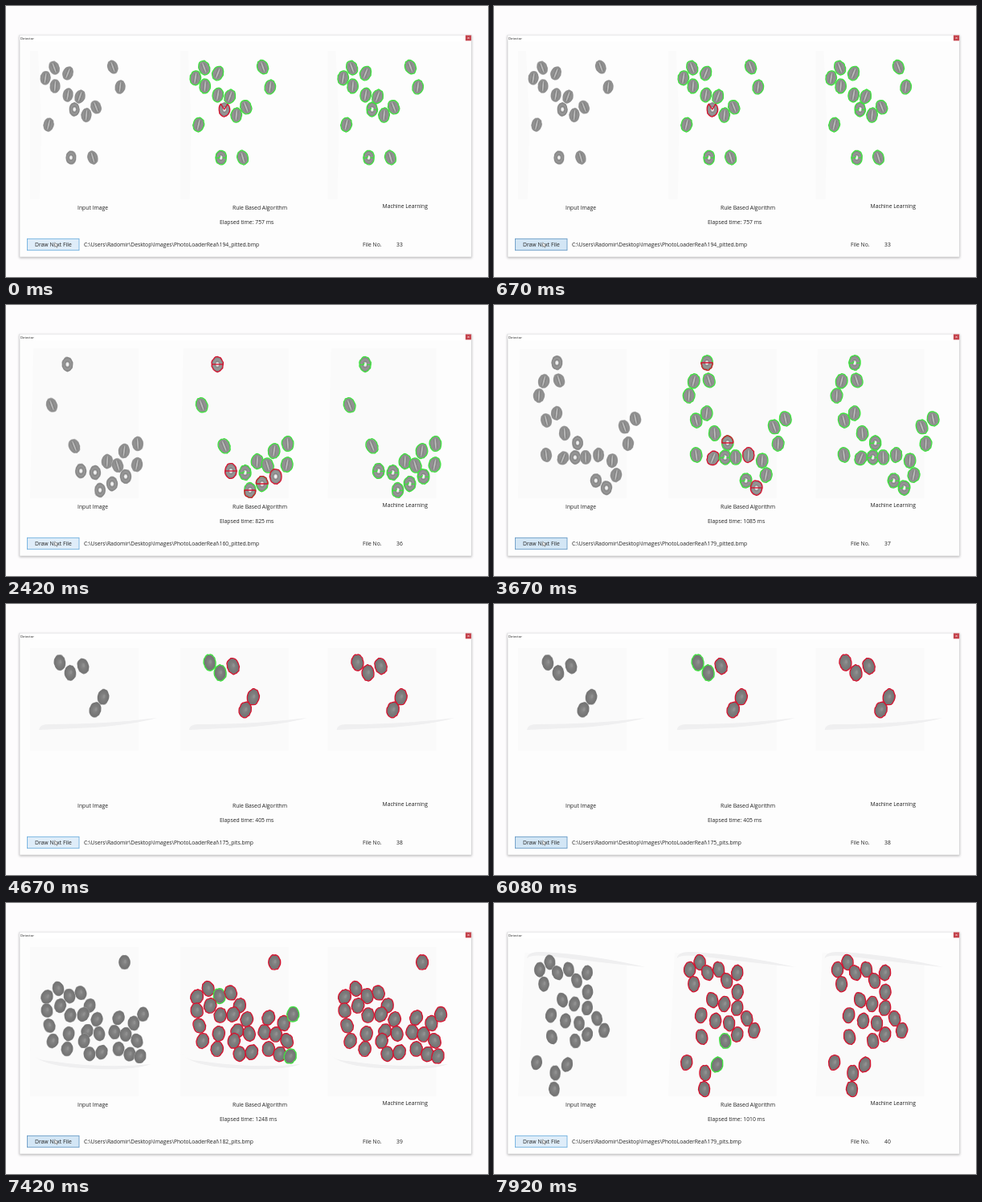
Animation of 600 by 338 pixels, one loop 8 s. Source, as an HTML page:

```html
<!DOCTYPE html>
<html lang="en">
<head>
<meta charset="utf-8">
<title>Detector</title>
<style>
html, body { margin: 0; width: 100%; height: 100%; overflow: hidden; background: #fdfcfd; }
svg { display: block; width: 600px; height: 338px; }
text { font: 6.8px "Open Sans", "Noto Sans", sans-serif; fill: #222; }
.window { fill: #fdfdfd; stroke: #d2d2d4; stroke-width: .6; filter: drop-shadow(0 1px 1.6px rgba(0,0,0,.28)); }
.outline { fill: none; stroke-width: 1.35; stroke-linejoin: round; }
.plate { fill: #fafafa; }
.streak { fill: #efeff0; }
</style>
</head>
<body>
<svg viewBox="0 0 600 338">
  <defs>
    <radialGradient id="ring">
      <stop offset="0" stop-color="#fafafa"/><stop offset=".2" stop-color="#e6e6e6"/>
      <stop offset=".38" stop-color="#858585"/><stop offset=".62" stop-color="#999"/>
      <stop offset=".88" stop-color="#858585"/><stop offset="1" stop-color="#b4b4b4"/>
    </radialGradient>
    <radialGradient id="split">
      <stop offset="0" stop-color="#a2a2a2"/><stop offset=".6" stop-color="#919191"/>
      <stop offset=".88" stop-color="#8d8d8d"/><stop offset="1" stop-color="#b8b8b8"/>
    </radialGradient>
    <radialGradient id="pit">
      <stop offset="0" stop-color="#8b8b8b"/><stop offset=".55" stop-color="#7b7b7b"/>
      <stop offset=".88" stop-color="#737373"/><stop offset="1" stop-color="#a6a6a6"/>
    </radialGradient>
  </defs>
  <rect class="window" x="17" y="36.3" width="562.5" height="276.7"/>
  <rect x="17.3" y="36.6" width="562" height="7.4" fill="#fff"/>
  <text x="18" y="41.7" style="font-size:4.2px">Detector</text>
  <rect x="572" y="36.5" width="7.2" height="6.8" fill="#c4434c"/>
  <path d="M574.6 38.9l2 2m0-2l-2 2" stroke="#fff" stroke-width=".6"/>
  <g id="panels"></g>
  <text x="89" y="253.8">Input Image</text>
  <text x="282" y="253.8">Rule Based Algorithm</text>
  <text x="468.5" y="251.6">Machine Learning</text>
  <text id="elapsed" x="266" y="271.6"></text>
  <rect id="button" x="26.4" y="290.3" width="64.6" height="14.4" stroke-width=".8"/>
  <text x="36" y="300">Draw Next File</text>
  <path d="M60.6 294.8v5.6l1.4-1.2 1 2.2 1-.5-1-2h1.7z" fill="#fff" stroke="#555" stroke-width=".5"/>
  <text id="path" x="97" y="300" style="font-size:6.75px"></text>
  <text x="444" y="300">File No.</text>
  <text id="number" x="486" y="300"></text>
</svg>
<script>
const LOOP = 8000;
const SHIFT = [0, 186.7, 370.6];
const GREEN = '#3fe03f', RED = '#d3122e';
const $ = id => document.getElementById(id);
const scenes = [];

function add(tag, parent, attrs) {
  const el = document.createElementNS('http://www.w3.org/2000/svg', tag);
  for (const k in attrs) el.setAttribute(k, attrs[k]);
  parent.append(el);
  return el;
}

const noise = n => { const v = Math.sin(n * 12.9898) * 43758.5453; return v - Math.floor(v); };

// Slightly uneven ellipse, or the part of it between two angles in turns.
function blob(rx, ry, seed, from = 0, to = 1, tail = '') {
  const pts = [];
  for (let i = 0; i <= 24; i++) {
    const turn = from + (to - from) * i / 24, a = turn * 2 * Math.PI;
    const k = .97 + .09 * noise(seed + Math.round(turn * 24) % 24);
    pts.push((rx * k * Math.cos(a)).toFixed(2) + ' ' + (ry * k * Math.sin(a)).toFixed(2));
  }
  return 'M' + pts.join('L') + tail + 'Z';
}

function drawMark(g, kind, s, rx, ry, seed, ring) {
  const line = (d, stroke) => add('path', g, { d, stroke, class: 'outline' });
  const all = blob(rx, ry, seed);
  if (kind === 'notch') return line(blob(rx, ry, seed, -.14, .64, 'L0 0'), RED);
  if (kind === 'red') return line(all, RED);
  if (kind === 'line') { line(all, RED); return line(`M${-rx} 0H${rx}`, RED); }
  line(all, GREEN);
  if (kind === 'top') return line(blob(rx, ry, seed, .5, 1), RED);
  if (kind === 'bottom') return line(blob(rx, ry, seed, 0, .5), RED);
  if (ring) line(`M${-rx} .5H-2L-1.2-2M1.8 .3H${rx}`, GREEN);
}

function drawBean(panel, s, i, mode) {
  const [x, y] = s.beans[i], seed = x * 7 + y * 3;
  const ring = s.rings.includes(i), [rx, ry] = s.size;
  const tilt = ring ? 0 : s.tilt ?? (noise(seed) - .5) * 44;
  const g = add('g', panel, { transform: `translate(${x} ${y}) rotate(${tilt.toFixed(1)})` });
  const fill = s.pits ? 'pit' : ring ? 'ring' : 'split';
  add('path', g, { d: blob(rx, ry, seed), fill: `url(#${fill})` });
  if (fill === 'split') {
    add('ellipse', g, { cx: -1.6, rx: .9, ry: ry * .65, fill: '#747474', opacity: .55 });
    add('ellipse', g, { cx: 1.8, rx: .9, ry: ry * .65, fill: '#747474', opacity: .5 });
    add('ellipse', g, { rx: .8, ry: ry * .75, fill: '#c4c4c4', opacity: .8 });
  } else if (s.pits) {
    add('ellipse', g, { cx: 1, cy: -1, rx: 1.5, ry: 2.5, fill: '#999', opacity: .5 });
  }
  if (!mode) return;
  const base = s.pits ? 'red' : 'green';
  drawMark(g, mode === 1 && s.marks[i] || base, s, rx, ry, seed, ring);
}

function scene(start, number, file, ms, opts) {
  const s = { rings: [], marks: {}, size: [6.9, 9], start, number, file, ms, ...opts };
  s.pits = file.endsWith('pits');
  s.group = add('g', $('panels'), { visibility: 'hidden' });
  SHIFT.forEach((dx, mode) => {
    const panel = add('g', s.group, { transform: `translate(${dx})` });
    add('path', panel, { d: s.plate, class: 'plate' });
    if (s.streak) add('path', panel, { d: s.streak, class: 'streak' });
    s.beans.forEach((_, i) => drawBean(panel, s, i, mode));
  });
  scenes.push(s);
}

scene(0, 33, '194_pitted', 757, {
  plate: 'M30 56H40L44 150L42 241H30Z', size: [6.6, 8.8],
  beans: [[60,77],[77,84],[49,90],[61,100],[77,111],[92,113],[85,129],[112,126],[100,136],
    [53,148],[81,189],[108,189],[133,76],[142,101]],
  rings: [6, 10], marks: { 6: 'notch' }
});
scene(750, 34, '196_pitted', 512, {
  plate: 'M30 56H155V241H30Z',
  beans: [[62,82],[84,96],[58,126],[97,131],[124,104],[76,163],[112,172],[137,151]],
  rings: [3, 5], marks: { 5: 'line' }
});
scene(1250, 35, '198_pitted', 244, {
  plate: 'M30 56H155V126H30Z', size: [7, 11.8], tilt: -17, beans: [[81.3,73.5]]
});
scene(2330, 36, '160_pitted', 825, {
  plate: 'M34 54H165V241H30Z', size: [7.1, 9.2],
  beans: [[76.5,74],[57,125],[85,176],[93,207],[111,209],[126,195],[139,200],[147,182],
    [164,173],[163,199],[149,214],[132,223],[117,231]],
  rings: [0, 3, 4, 10, 11, 12],
  marks: { 0: 'line', 3: 'line', 10: 'red', 11: 'top', 12: 'bottom' }
});
scene(3420, 37, '179_pitted', 1085, {
  plate: 'M32 55H165V241H30Z', size: [7.1, 9],
  beans: [[78.5,72],[62,95],[81,94],[56,113],[65,144],[78,135],[88,160],[104,172],[65,187],
    [86,191],[101,190],[114,190],[130,187],[147,194],[162,152],[176,142],[167,173],[152,212],
    [127,219],[140,228]],
  rings: [0, 7, 10, 18, 19],
  marks: { 0: 'bottom', 7: 'top', 9: 'red', 12: 'red', 19: 'line' }
});
scene(4080, 38, '175_pits', 405, {
  plate: 'M30 55H165V183H30Z', size: [7.3, 9.9],
  streak: 'M41 157Q42 149 55 150Q125 150 188 142Q160 150 110 154Z',
  beans: [[67,73],[80,86],[96,77.5],[121,116],[111,132]],
  marks: { 0: 'green', 1: 'green' }
});
scene(6250, 39, '182_pits', 1248, {
  plate: 'M30 55H165V241H30Z', size: [7.4, 9.2],
  streak: 'M30 180Q31 196 55 197Q120 207 180 201Q155 210 95 206Q30 202 30 180Z',
  beans: [[147.5,74],[65,107],[51,117],[79,116],[93,112],[67.5,128],[51,134],[104,128],
    [54,153],[80,140],[96,139],[113,145],[140,143],[159,150],[170.5,139],[58,172],[78,163],
    [101,160],[116,163],[135,161],[149,164],[163,172],[76,182],[97,172],[104,188],[119,186],
    [140,182],[154,188.5],[167,191]],
  marks: { 3: 'green', 14: 'green', 28: 'green' }
});
scene(7500, 40, '179_pits', 1010, {
  plate: 'M38 62L165 74V241H30Z', size: [6.9, 9.4],
  streak: 'M41 69Q42 60 60 61Q120 64 189 80Q130 74 75 67Q45 63 41 69Z',
  beans: [[57,83],[69.5,74],[79,87],[93,83],[103,97],[116,87],[62,101],[116.5,111],[85,121],
    [100,126],[116,131],[71,140],[89,147],[106,150],[128,144],[72,167],[101,172],[116,164],
    [137,159],[53,199],[91,201.5],[76,212],[75,232]],
  marks: { 16: 'green', 20: 'green' }
});

// The button stays down while the next picture is worked on.
const presses = [[170, 830], [1000, 1330], [1500, 2400], [2500, 3500], [3580, 4170],
  [5000, 6330], [6500, 7660]];
let shown;

function render(t) {
  const now = scenes.findLast(s => s.start <= t);
  if (now !== shown) {
    if (shown) shown.group.setAttribute('visibility', 'hidden');
    now.group.setAttribute('visibility', 'visible');
    $('elapsed').textContent = `Elapsed time: ${now.ms} ms`;
    $('path').textContent = `C:\\Users\\Radomir\\Desktop\\Images\\PhotoLoaderReal\\${now.file}.bmp`;
    $('number').textContent = now.number;
    shown = now;
  }
  const down = presses.some(([a, b]) => t >= a && t < b);
  $('button').setAttribute('fill', down ? '#d3e6f5' : '#dfedf9');
  $('button').setAttribute('stroke', down ? '#5b92c0' : '#62a8dc');
}

const origin = performance.now();
function tick() {
  render((performance.now() - origin) % LOOP);
  requestAnimationFrame(tick);
}
tick();
</script>
</body>
</html>
```
